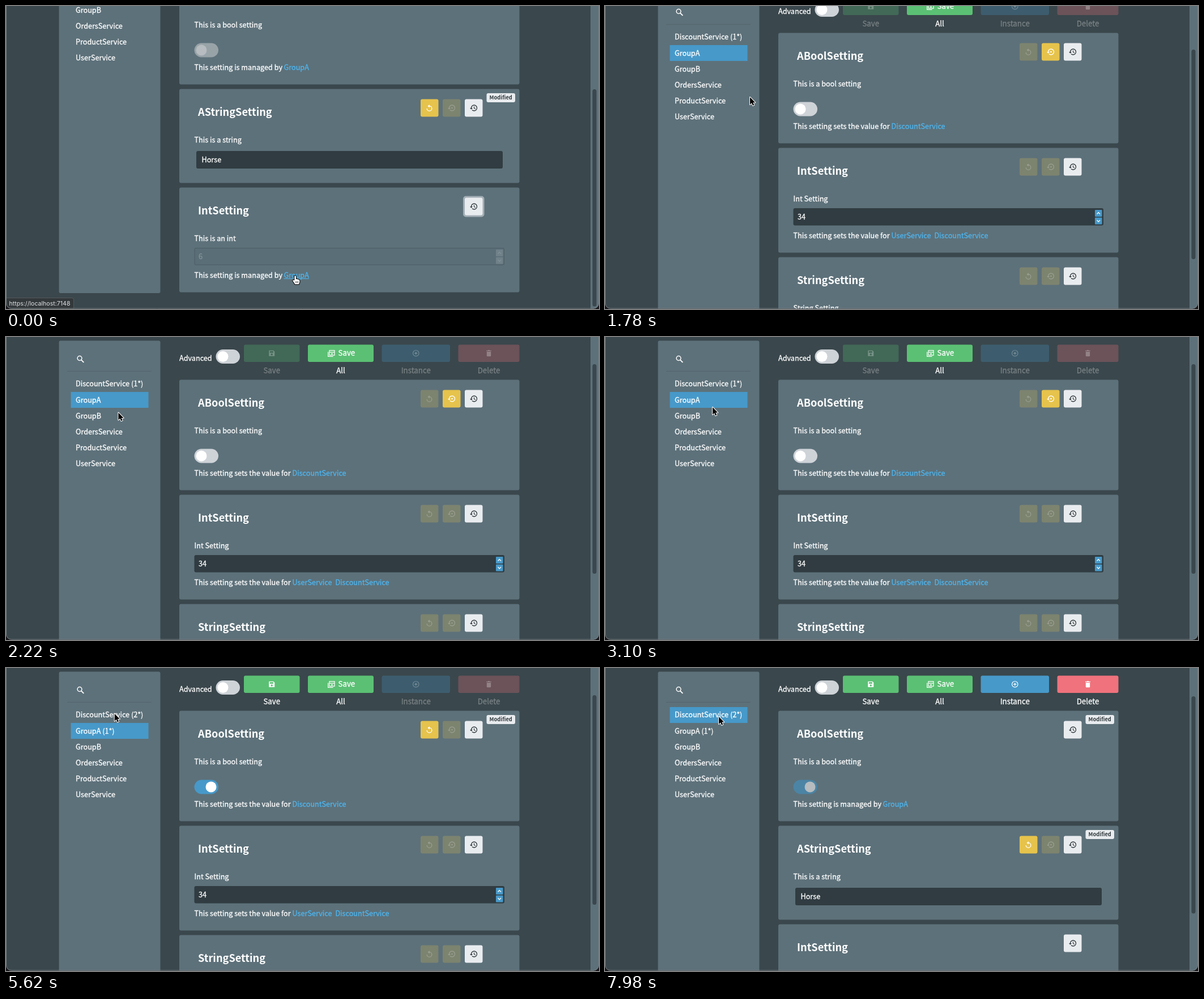
These frames come from a looping animation (1047x535 px, 8 s). An HTML page with a canvas:

```html
<!DOCTYPE html>
<html lang="en">
<head>
<meta charset="utf-8">
<title>Settings</title>
<style>
html, body { margin: 0; width: 100%; height: 100%; overflow: hidden; background: #17171b; }
canvas { display: block; }
</style>
</head>
<body>
<canvas id="stage" width="1047" height="535"></canvas>
<script>
const ctx = document.getElementById('stage').getContext('2d');
const LOOP = 8000, TICK = 146.7;
const SANS = '"Noto Sans CJK JP", "Noto Sans CJK SC", "Noto Sans CJK", "Noto Sans", sans-serif';
const C = {
  page: '#3a474c', card: '#5d717a', field: '#303c41', light: '#e9ecef', dark: '#2f383c',
  blue: '#4799c9', link: '#4db5ef', green: '#5bc074', red: '#ef727c', yellow: '#e6c34c',
  track: '#ced3d8', white: '#fff'
};

// ---- timing ----
const ticks = (t, start) => t + 8 < start ? 0 : Math.floor((t + 8 - start) / TICK) + 1;

// start, number of steps, x, y
const MOVES = [
  [1330, 2, 256, 161],
  [2070, 5, 166, 118],
  [3100, 1, 190, 124],
  [3250, 5, 357, 209],
  [5040, 6, 187, 77],
  [6810, 4, 357, 214],
  [7400, 4, 214, 80],
  [7980, 1, 201, 86]
];

function pointer(t) {
  let x = 511, y = 477;
  for (const [start, steps, tx, ty] of MOVES) {
    const u = Math.min(1, ticks(t, start) / steps);
    const e = 1 - (1 - u) ** 2;
    x += (tx - x) * e;
    y += (ty - y) * e;
  }
  return [x, y];
}

function stateAt(t) {
  const group = t >= 600 && t < 6520;
  const n = ticks(t, 1780);
  const decay = r => n > 3 ? 0 : 132 * r ** n;
  const [x, y] = pointer(t);
  const changed = t >= 4590;
  let cursor = 'arrow';
  if (t < 740) cursor = 'hand';
  else if (t < 1330) cursor = 'beam';
  else if (group && x > 333 && x < 375 && y > 198 && y < 223) cursor = 'hand';
  return {
    t, group, changed, x, y, cursor,
    scroll: Math.round(decay(0.213)),
    thumb: decay(0.311),
    knob: t < 4590 ? 0 : t < 4740 ? 0.25 : 1,
    status: t < 890 ? 1 : t < 1040 ? 0.5 : 0
  };
}

// ---- drawing helpers ----
function box(x, y, w, h, r, fill) {
  ctx.beginPath();
  ctx.roundRect(x, y, w, h, r);
  ctx.fillStyle = fill;
  ctx.fill();
}

function disc(x, y, r, fill) {
  ctx.beginPath();
  ctx.arc(x, y, r, 0, 7);
  ctx.fillStyle = fill;
  ctx.fill();
}

function faded(alpha, draw) {
  ctx.save();
  ctx.globalAlpha *= alpha;
  draw();
  ctx.restore();
}

function text(str, x, cy, { size = 12.65, weight = 400, color = C.white, align = 'left' } = {}) {
  ctx.font = `${weight} ${size}px ${SANS}`;
  ctx.textAlign = align;
  ctx.fillStyle = ctx.strokeStyle = color;
  const y = Math.round(cy + size * 0.37);
  ctx.fillText(str, x, y);
  if (weight === 400) {
    ctx.lineWidth = 0.3;
    ctx.strokeText(str, x, y);
  }
}

function line(points, color, width = 1.3) {
  ctx.beginPath();
  points.forEach(([x, y]) => ctx.lineTo(x, y));
  ctx.strokeStyle = color;
  ctx.lineWidth = width;
  ctx.stroke();
}

function triangle(points, color) {
  ctx.beginPath();
  points.forEach(([x, y]) => ctx.lineTo(x, y));
  ctx.fillStyle = color;
  ctx.fill();
}

function arc(x, y, r, from, to, color, width = 1.3) {
  ctx.beginPath();
  ctx.arc(x, y, r, from, to);
  ctx.strokeStyle = color;
  ctx.lineWidth = width;
  ctx.stroke();
}

const ICONS = {
  undo(c) {
    arc(0, 1, 4.3, -Math.PI / 2, Math.PI, c);
    triangle([[0.3, -6], [0.3, -0.6], [-3, -3.3]], c);
  },
  reset(c) {
    arc(1, 0, 5, Math.PI, Math.PI * 2.75, c);
    triangle([[-6.5, 0], [-1.5, 0], [-4, 2.7]], c);
    disc(1, 0, 1.3, c);
  },
  history(c) {
    arc(1, 0, 5, Math.PI, Math.PI * 2.75, c);
    triangle([[-6.5, 0], [-1.5, 0], [-4, 2.7]], c);
    line([[1, -2.8], [1, 0.4], [3.4, 1.8]], c, 1.1);
  },
  save(c) {
    ctx.beginPath();
    ctx.moveTo(-5, -5);
    for (const [x, y] of [[3, -5], [5, -3], [5, 5], [-5, 5]]) ctx.lineTo(x, y);
    ctx.closePath();
    ctx.rect(-3.4, -3.6, 6, 2.6);
    ctx.moveTo(1.7, 2);
    ctx.arc(0, 2, 1.7, 0, 7);
    ctx.fillStyle = c;
    ctx.fill('evenodd');
  },
  saveAll(c) {
    ctx.strokeStyle = c;
    ctx.lineWidth = 1.2;
    ctx.strokeRect(-3.5, -5, 9, 8.5);
    line([[-5.8, -2.5], [-5.8, 5.7], [3, 5.7]], c, 1.2);
    line([[-3.5, -1.8], [5.5, -1.8]], c, 1.4);
    disc(1, 1, 1.3, c);
  },
  add(c) {
    arc(0, 0, 5.2, 0, 7, c, 1.2);
    line([[-2.8, 0], [2.8, 0]], c, 1.2);
    line([[0, -2.8], [0, 2.8]], c, 1.2);
  },
  bin(c) {
    box(-3.7, -2.8, 7.4, 8.4, [0, 0, 1, 1], c);
    box(-4.5, -5, 9, 1.4, 0, c);
    box(-1.5, -5.8, 3, 1, 0, c);
  }
};

function icon(name, x, y, color) {
  ctx.save();
  ctx.translate(x, y);
  ICONS[name](color);
  ctx.restore();
}

function mix(a, b, u) {
  const ch = (h, i) => parseInt(h.slice(i, i + 2), 16);
  return `rgb(${[1, 3, 5].map(i => Math.round(ch(a, i) + (ch(b, i) - ch(a, i)) * u))})`;
}

function toggle(x, cy, on, disabled) {
  const off = disabled ? '#98a3a8' : C.track;
  const full = disabled ? '#4c84a5' : C.blue;
  box(x, cy - 12.5, 42.5, 25, 12.5, mix(off, full, on === 0.25 ? 0.35 : on));
  disc(x + 12.5 + 17 * on, cy, 9.5, disabled ? '#b6bcbf' : C.white);
}

// ---- page parts ----
function iconButton(name, x, y, enabled) {
  const plain = name === 'history';
  faded(enabled ? 1 : 0.22, () => {
    box(x, y, 31.5, 31, 3, plain ? C.light : C.yellow);
    icon(name, x + 15.5, y + 15.5, plain ? C.dark : C.white);
  });
}

function links(prefix, names, y, hover) {
  text(prefix, 332.5, y);
  let x = prefix.endsWith('by') ? 490.5 : 505.5;
  for (const name of names) {
    text(name, x, y, { color: C.link });
    const w = ctx.measureText(name).width;
    if (hover) box(x, Math.round(y) + 6, w, 1, 0, C.link);
    x += w + 6;
  }
}

function spinner(y, enabled) {
  [0, 13.5].forEach((dy, i) => {
    const cy = y + 9 + dy, d = i ? -1.5 : 1.5;
    if (enabled) box(865, y + 3 + dy, 12.5, 12, 1, C.blue);
    else faded(0.15, () => box(865, y + 3 + dy, 12.5, 12, 1, C.light));
    line([[868.5, cy + d], [871.2, cy - d], [874, cy + d]], enabled ? C.white : '#80919a', 1.2);
  });
}

const FIELDS = {
  bool(top, o) {
    toggle(332.5, top + 134.5, o.on, o.managed);
    return 164.5;
  },
  int(top, o) {
    const y = top + 106.5;
    if (o.managed) {
      box(332.5, y, 547.5, 30.5, 3, '#4d5f67');
      box(333.5, y + 1, 545.5, 28.5, 2, '#5a6e77');
    } else box(332.5, y, 547.5, 30.5, 3, C.field);
    text(o.value, 340, y + 15.5, { color: o.managed ? '#82939b' : C.white });
    spinner(y, !o.managed);
    return 154.5;
  },
  string(top, o) {
    box(336, top + 109.5, 541, 31, 3, C.field);
    text(o.value, 345.5, top + 125);
    return 161.5;
  }
};

function card(top, o) {
  box(306, top, 600.5, o.height, 3, C.card);
  text(o.title, 339, top + 41, { size: 18.2, weight: 700 });
  text(o.label, 332.5, top + 90);
  if (o.focus) faded(0.5, () => box(807, top + 15, 37.5, 37, 5, C.light));
  if (!o.managed) {
    iconButton('undo', 732, top + 18, o.undo);
    iconButton('reset', 771, top + 18, o.reset);
  }
  iconButton('history', 810, top + 18, true);
  if (o.modified) {
    box(848.5, top + 7.5, 50.5, 16, 3, C.light);
    text('Modified', 873.7, top + 15.5, { size: 9.3, weight: 700, color: C.dark, align: 'center' });
  }
  const linkY = FIELDS[o.type](top, o);
  if (o.links) links(o.managed ? 'This setting is managed by' : 'This setting sets the value for', o.links, top + linkY, o.hover);
}

function cards(s) {
  const { group, changed, t } = s;
  const bool = { type: 'bool', title: 'ABoolSetting', label: 'This is a bool setting', height: 195, on: s.knob, modified: changed };
  if (group) return [
    { ...bool, links: ['DiscountService'], undo: changed, reset: !changed },
    { type: 'int', title: 'IntSetting', label: 'Int Setting', height: 185, value: '34', links: ['UserService', 'DiscountService'] },
    { type: 'string', title: 'StringSetting', label: 'String Setting', height: 192, value: 'Cat', links: ['UserService'] }
  ];
  return [
    { ...bool, links: ['GroupA'], managed: true },
    { type: 'string', title: 'AStringSetting', label: 'This is a string', height: 166, value: 'Horse', undo: true, modified: true },
    { type: 'int', title: 'IntSetting', label: 'This is an int', height: 185, value: '6', links: ['GroupA'], managed: true, focus: t < 600, hover: t < 600 }
  ];
}

function sidebar(s) {
  box(93.5, 6.5, 179, 506.5 + 132 - 6, 3, C.card);
  arc(130, 37.5, 3.9, 0, 7, C.white, 1.5);
  line([[132.8, 40.3], [137.3, 44.8]], C.white, 1.9);
  box(108, 60, 149, 1, 0, '#54666e');
  const names = [
    `DiscountService (${s.changed ? 2 : 1}*)`, s.changed ? 'GroupA (1*)' : 'GroupA',
    'GroupB', 'OrdersService', 'ProductService', 'UserService'
  ];
  names.forEach((name, i) => {
    const cy = 82.7 + 28.2 * i;
    const row = () => box(114.5, Math.round(cy - 14.2), 137, 28, 0, C.blue);
    if (i === (s.group ? 1 : 0)) row();
    else if (i === 0 && s.t >= 5770) faded(0.5, row);
    text(name, 123, cy);
  });
}

function toolButton(x, w, color, name, label, enabled) {
  const mid = x + w / 2;
  const all = name === 'saveAll';
  faded(enabled ? 1 : 0.27, () => {
    box(x, 13.5, w, 30.5, 3, color);
    icon(name, all ? 574.5 : mid, 28.7, C.white);
    if (all) text('Save', 586.5, 28.5, { size: 13.3 });
    text(label, mid, 59, { size: 13.3, align: 'center' });
  });
}

function toolbar(s) {
  text('Advanced', 306, 37.5);
  toggle(370.5, 34.5, 0, false);
  toolButton(420, 98.5, C.green, 'save', 'Save', s.changed);
  toolButton(533, 116, C.green, 'saveAll', 'All', true);
  toolButton(663.5, 120.5, C.blue, 'add', 'Instance', !s.group);
  toolButton(798.5, 108, C.red, 'bin', 'Delete', !s.group);
}

function scrollbar(s) {
  box(1032, 0, 15, 535, 0, C.card);
  const [top, len, rate] = s.group ? [48, 370, 0.705] : [50, 383.5, 0.735];
  box(1035.5, top + s.thumb * rate, 7, len, 3.5, C.page);
}

function statusBar(alpha) {
  if (!alpha) return;
  faded(alpha, () => {
    box(-4, 515, 124, 24, 4, '#53585b');
    box(-4, 516, 123, 24, 3, '#33383b');
    ctx.font = '400 10.6px Inter, Roboto, sans-serif';
    ctx.textAlign = 'left';
    ctx.fillStyle = '#e0e2e3';
    ctx.fillText('https://localhost:7148', 5.5, 529);
  });
}

const ARROW = new Path2D('M0 0V13l3-2.8 2 4.6 2.2-1-2-4.4h4z');
const HAND = new Path2D('M-1.6 7V.6a1.3 1.3 0 0 1 2.6 0V5.2l1-.3 1.6.6 1.4.2 1.5.9q1 .5 1 2.2c0 3-1.2 3.6-1.2 5.4H-1c-.4-2-2.8-3.8-3.6-5.6-.6-1.4.9-2 1.7-1z');
const BEAM = new Path2D('M-3.5-7Q0-7 0-5V5Q0 7-3.5 7M3.5-7Q0-7 0-5V5Q0 7 3.5 7M-1.8 2H1.8');

function cursor({ x, y, cursor: kind }) {
  const stroke = (path, color, width) => {
    ctx.strokeStyle = color;
    ctx.lineWidth = width;
    ctx.stroke(path);
  };
  ctx.save();
  ctx.translate(x, y);
  ctx.lineJoin = 'round';
  if (kind === 'beam') {
    stroke(BEAM, C.white, 2.6);
    stroke(BEAM, '#000', 1);
  } else {
    const hand = kind === 'hand';
    const path = hand ? HAND : ARROW;
    stroke(path, hand ? '#000' : C.white, 2);
    ctx.fillStyle = hand ? C.white : '#000';
    ctx.fill(path);
    if (hand) [1, 3, 5].forEach(i => line([[i - 0.4, 9], [i - 0.4, 12]], '#000', 0.7));
  }
  ctx.restore();
}

function draw(t) {
  const s = stateAt(t);
  ctx.fillStyle = '#17171b';
  ctx.fillRect(0, 0, 1047, 535);
  ctx.save();
  ctx.beginPath();
  ctx.roundRect(0.5, -20, 1046, 554.5, 9);
  ctx.clip();
  ctx.fillStyle = C.page;
  ctx.fillRect(0, 0, 1047, 535);

  ctx.save();
  ctx.translate(0, -s.scroll);
  sidebar(s);
  toolbar(s);
  let top = 75.5;
  for (const c of cards(s)) {
    card(top, c);
    top += c.height + 8;
  }
  ctx.restore();

  scrollbar(s);
  statusBar(s.status);
  ctx.restore();

  ctx.beginPath();
  ctx.roundRect(0.5, -20, 1046, 554, 9);
  ctx.strokeStyle = '#788185';
  ctx.lineWidth = 1;
  ctx.stroke();
  cursor(s);
}

function frame() {
  draw(performance.now() % LOOP);
  requestAnimationFrame(frame);
}
frame();
</script>
</body>
</html>
```
